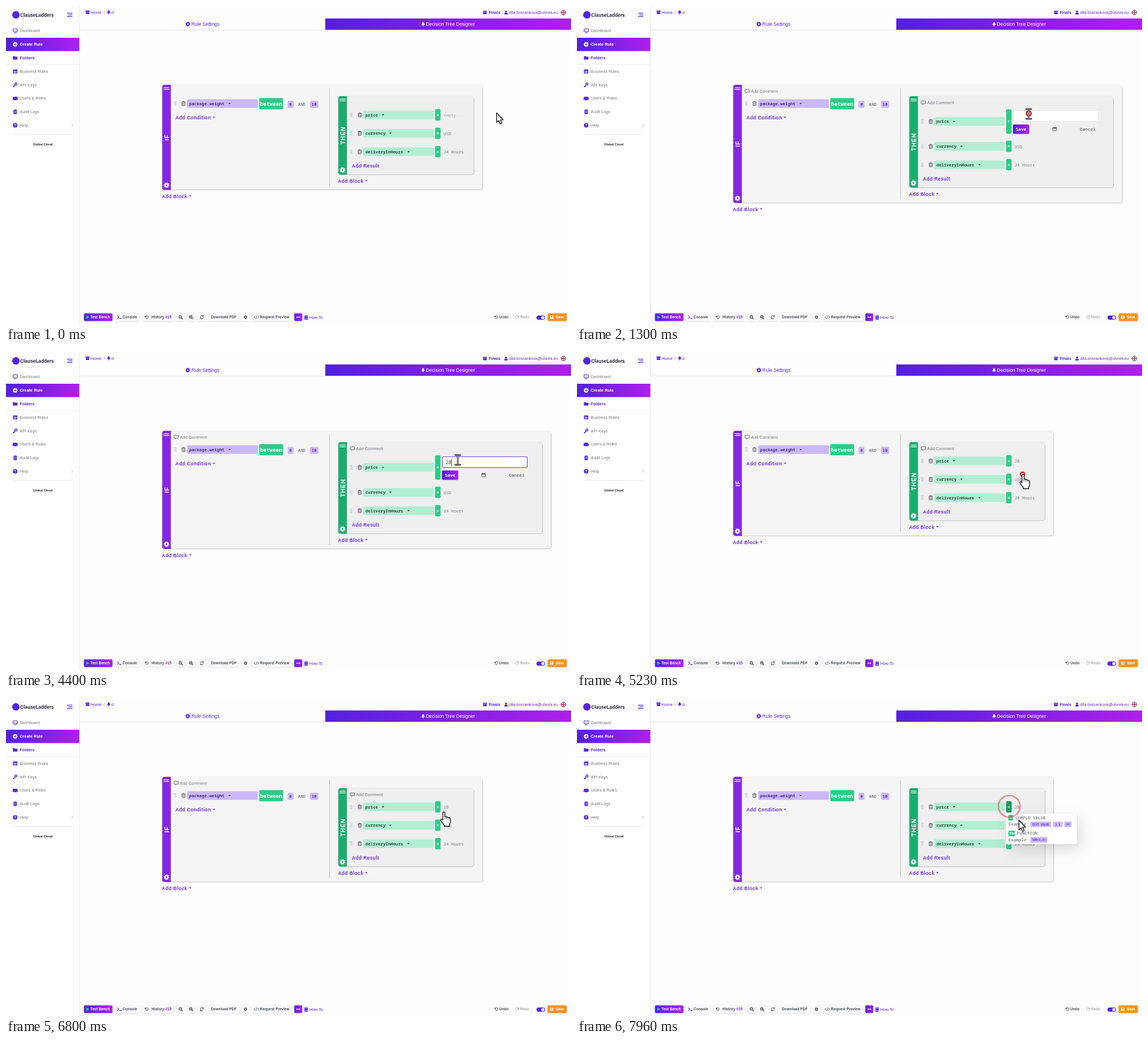
Animation of 998 by 561 pixels, one loop 8000 ms. Source, as an HTML page:

```html
<!DOCTYPE html>
<html lang="en">
<head>
<meta charset="utf-8">
<title>Decision tree editor</title>
<style>
html, body { margin: 0; width: 100%; height: 100%; overflow: hidden; background: #fefefe; }
svg { display: block; width: 100vw; height: 100vh; }
text { font-family: "Liberation Sans", sans-serif; white-space: pre; }
.b { font-weight: 700; }
.m { font-family: "Noto Sans Mono", monospace; }
.s { font-weight: 600; }
.link { font-weight: 700; letter-spacing: .43px; }
.c { text-anchor: middle; }
#popup > rect:first-child { filter: drop-shadow(7px 10px 12px #0002) drop-shadow(0 1px 2px #0001); }
.lift { filter: drop-shadow(0 1px 1.5px #0002); }
</style>
</head>
<body>
<svg id="stage" viewBox="0 0 998 561" xmlns="http://www.w3.org/2000/svg"></svg>
<script>
const PURPLE = '#5226dc', LINK = '#6a2cdc', GREY = '#74767c', DARK = '#4b4f58';
const GREEN = '#2bcc89', MINT = '#b1eed2', LILAC = '#cab8f8', WHITE = '#fff', GRAD = 'url(#grad)';

// Drawing helpers; text y is the middle of the capitals
const text = (x, y, str, size, fill, cls = '') =>
  `<text x="${x}" y="${y + size * .35}" font-size="${size}" fill="${fill}" class="${cls}">${str}</text>`;
const rect = (x, y, w, h, fill, r = 0, more = '') =>
  `<rect x="${x}" y="${y}" width="${w}" height="${h}" rx="${r}" fill="${fill}" ${more}/>`;
const path = (d, fill, more = '') => `<path d="${d}" fill="${fill}" ${more}/>`;
const line = (d, color, w = 1) =>
  path(d, 'none', `stroke="${color}" stroke-width="${w}" stroke-linecap="round" stroke-linejoin="round"`);
const dot = (x, y, r, fill, more = '') => `<circle cx="${x}" cy="${y}" r="${r}" fill="${fill}" ${more}/>`;
const circle = (x, y, r, color, w = 1, more = '') =>
  dot(x, y, r, 'none', `stroke="${color}" stroke-width="${w}" ${more}`);
const gear = (x, y, r, color) => circle(x, y, r * .54, color, r * .42) +
  circle(x, y, r * .84, color, r * .34, 'pathLength="16" stroke-dasharray="1.1 .9"');
const caret = (x, y, color) => path(`M${x - 2.2} ${y - 1}h4.4l-2.2 2.4z`, color);
const group = (id, body, more = '') => `<g id="${id}" ${more}>${body}</g>`;

const trash = (x, y) => rect(x - 2.6, y - 2.4, 5.2, 6.2, 'none', .8, `stroke="${DARK}" stroke-width=".9"`) +
  line(`M${x - 3.4} ${y - 2.6}h6.8M${x - 1.2} ${y - 3.8}h2.4M${x - .9} ${y - .6}v2.8M${x + .9} ${y - .6}v2.8`, DARK, .75);
const grip = (x, y) =>
  path(`M${x - 1.2} ${y - 4}v8M${x + 1.2} ${y - 4}v8`, 'none', 'stroke="#aaa" stroke-width="1" stroke-dasharray="1.4 .7"');
const tree = (x, y, c) => path(`M${x} ${y - 4}l2.4 3h-1l2 2.6h-2.7v2h-1.4v-2h-2.7l2-2.6h-1z`, c);
const box = (x, y, c) => path(`M${x - 3.6} ${y - 3}h7.2v2h-7.2zM${x - 3.1} ${y - .5}h6.2v3.6h-6.2z`, c);
const person = (x, y, c, k = 1) =>
  dot(x, y - 1.7 * k, 1.8 * k, c) + path(`M${x - 3 * k} ${y + 3.5 * k}q0-3.3 ${3 * k}-3.3t${3 * k} 3.3z`, c);
const comment = (x, y) =>
  line(`M${x} ${y - 3}h7v5h-3.6l-1.6 1.7v-1.7h-1.8z`, DARK, .8) + text(x + 10, y, 'Add Comment', 7.4, GREY);

function sidebar() {
  const item = (y, str) => text(24.3, y, str, 7.28, GREY);
  return rect(0, 0, 129.5, 561, WHITE) + rect(129.3, 0, 1, 561, '#e9e9ee') +
    dot(17.5, 15.7, 6.6, PURPLE) + text(25, 15.7, 'ClauseLadders', 8.3, '#262338', 'b') +
    line('M108.3 12.7h8.5M110.5 15.7h6.3M108.3 18.7h8.5', PURPLE, 1.2) +
    rect(12.5, 40.2, 7.6, 5, 'none', .7, `stroke="${PURPLE}" stroke-width="1.1"`) + line('M14.5 47.3h3.6', PURPLE, 1) +
    item(43.7, 'Dashboard') +
    rect(0, 56, 129.5, 23.5, GRAD) + dot(16.2, 67.8, 4, WHITE) + line('M14.2 67.8h4M16.2 65.8v4', '#5a22e0', 1.1) +
    text(24.3, 67.8, 'Create Rule', 7.28, WHITE, 'b') +
    path('M12.2 88.4h3l1 1h4v5h-8z', PURPLE) + text(24.3, 91.5, 'Folders', 7.28, PURPLE, 'b') +
    rect(0, 103, 129.5, .8, '#e6e6ea') +
    rect(12.3, 112, 7.8, 7, PURPLE, .8) + line('M13.3 115h5.8M13.3 117.2h5.8M16.2 114.6v3.6', WHITE, .7) +
    item(115.5, 'Business Rules') +
    circle(17.6, 137.6, 1.9, PURPLE, 1.4) + line('M16 139.3l-3.2 3.1M13.6 141.6l1 1', PURPLE, 1.4) + item(139.4, 'API Keys') +
    person(13.6, 162.5, PURPLE, .75) + person(18.8, 162.5, PURPLE, .75) + person(16.2, 163, PURPLE, .95) +
    item(162.7, 'Users &amp; Roles') +
    rect(12.9, 182.8, 6.6, 8, PURPLE, 2) + line('M13.4 185.4h5.6M13.4 188h5.6', WHITE, .6) + item(186.6, 'Audit Logs') +
    dot(16.2, 210.5, 4, PURPLE) + text(16.2, 210.6, '?', 6.4, WHITE, 'b c') + item(210.5, 'Help') +
    line('M116.3 208.4l2 2-2 2', '#999', .8) + rect(13, 226.2, 104, .8, '#e0e0e4') +
    text(65, 244.2, 'Global Cloud', 5.5, '#222', 'b c');
}

function header() {
  const flag = dot(984.5, 11.5, 4.8, '#2b4a9b') +
    line('M981.4 8.4l6.2 6.2M987.6 8.4l-6.2 6.2', WHITE, 1.3) +
    line('M980.6 11.5h7.8M984.5 7.6v7.8', WHITE, 2.6) + line('M980.2 11.5h8.6M984.5 7.2v8.6', '#d8243c', 1.4);
  return box(144, 11, PURPLE) + text(149.3, 11.3, 'Home', 7.28, PURPLE) + text(172.5, 11.3, '/', 7.28, GREY) +
    tree(181.4, 11, PURPLE) + text(186, 11.3, 'd', 7.28, PURPLE) +
    box(846, 11.4, PURPLE) + text(852.7, 11.6, 'Finals', 7.1, PURPLE, 'b') +
    person(883.2, 11.4, PURPLE) + text(888.3, 11.6, 'dita.brezankova@ulvrek.eu', 7.15, LINK) + flag +
    gear(321.2, 32, 4.2, PURPLE) + text(327.6, 32, 'Rule Settings', 8.32, PURPLE) +
    rect(130, 42, 434, .8, '#d6d6da') + rect(564, 22, 434, 20, GRAD) +
    tree(736.8, 32, WHITE) + text(741.8, 32, 'Decision Tree Designer', 8.32, WHITE);
}

function toolbar() {
  const y = 549;
  const btn = (x, w, fill = '#f9f9fb') => rect(x, 542.3, w, 13.4, fill, 1.8, 'class="lift"');
  const label = (x, str, fill = DARK) => text(x, y, str, 6.5, fill, 'b');
  const lens = (x, d) => circle(x - .6, y - .6, 2.3, DARK, 1.1) + line(`M${x + 1.3} ${y + 1.3}l1.7 1.7`, DARK, 1.3) +
    line(`M${x - 1.6} ${y - .6}h2${d}`, DARK, .7);
  const turn = (x, c, k) =>
    line(`M${x - 2.5 * k} ${y - 2.4}v2h${2 * k}M${x - 2.3 * k} ${y - .6}a2.6 2.6 0 1 ${k > 0 ? 1 : 0} ${.8 * k} 2.4`, c, 1);
  return btn(137.7, 50.4, GRAD) + path('M141.8 546l5.6 3-5.6 3z', GREEN) + label(149, 'Test Bench', WHITE) +
    btn(192.3, 43.8) + line('M197 546.7l2.4 2.2-2.4 2.2M200.6 551.4h3', PURPLE, 1.1) + label(206, 'Console') +
    btn(240.7, 56.6) + turn(248.3, DARK, 1) + line('M248.3 547.8v1.4l.9.6', DARK, .7) +
    label(257, 'History') + label(281.6, '#15', LINK) +
    btn(301.2, 14.8) + lens(308.6, '') + btn(319.6, 14.8) + lens(327, 'm-1-1v2') +
    btn(338.3, 15.2) + line('M343.3 548.4a2.7 2.7 0 0 1 5-1M348.5 546v1.7h-1.7M348.5 549.6a2.7 2.7 0 0 1-5 1M343.3 552v-1.7h1.7', DARK, 1) +
    btn(357.8, 53.7) + text(362, y, 'Download PDF', 6.4, DARK, 'b') + btn(415.2, 15.4) + gear(423, y, 3.1, DARK) +
    btn(434.5, 70.7) + line('M440 547l-1.9 2 1.9 2M444.6 547l1.9 2-1.9 2M443 546.4l-1.4 5.2', DARK, .9) +
    label(448.6, 'Request Preview') +
    btn(509.3, 14, GRAD) + line('M513.4 549h5.8M514.6 547.9l-1.2 1.1 1.2 1.1M518 547.9l1.2 1.1-1.2 1.1', WHITE, .9) +
    rect(527.2, 546, 6, 7.4, PURPLE, .9) + line('M528.8 548h3M528.5 551.7h4.3', WHITE, .7) +
    text(535.7, 550, 'How-To', 7.1, PURPLE) +
    turn(866, DARK, 1) + label(871, 'Undo') + turn(903, '#a9abb0', -1) + label(908, 'Redo', '#a9abb0') +
    rect(937, 546, 15.2, 7.6, PURPLE, 3.8) + dot(948.3, 549.8, 2.7, WHITE) +
    btn(956.6, 34, '#f9921b') + rect(961, 546.2, 5.8, 5.8, WHITE, .8) + rect(962.2, 547, 3, 1.4, '#f9921b') +
    dot(963.9, 550.3, .9, '#f9921b') + label(971, 'Save', WHITE);
}

// One block frame: coloured bar with handle, rotated word and gear
function block(x, y, w, h, bg, color, word) {
  const cx = x + 7.5;
  return rect(x, y, w, h, bg, 4.5, 'stroke="#e2e2e4" stroke-width=".6"') +
    path(`M${x + 4} ${y + h}H${x + w - 4.5}q4.5 0 4.5-4.5V${y + 5}`, 'none', 'stroke="#bdbdc1" stroke-width=".9"') +
    path(`M${x + 15.2} ${y}v${h}h-11.2q-4 0-4-4v${8 - h}q0-4 4-4z`, color) +
    line(`M${x + 3} ${y + 5.3}h9.2M${x + 3} ${y + 8.4}h9.2`, WHITE, 1.3) +
    `<text transform="translate(${cx + 4.8} ${y + h / 2}) rotate(-90)" font-size="10.4" letter-spacing=".9" fill="#fff" class="b c">${word}</text>` +
    gear(cx, y + h - 8.4, 4.9, WHITE);
}

function board(open) {
  const dy = open ? 23 : 0, dx = open ? 121 : 0;
  const addBlock = (x, y) => text(x, y, 'Add Block', 8.32, LINK, 'link') + caret(x + 50, y - .6, LINK);
  const row = (y, name, value, cx, h = 20) => grip(610, y) + trash(624.8, y) +
    rect(630.8, y - 7.6, 124.8, 15.2, MINT, 2.5) + text(634.8, y, name, 7.42, '#2a4a42', 'm s') + caret(cx, y, '#2a4a42') +
    rect(758, y - h / 2, 9.6, h, GREEN, 2) + text(762.8, y, '=', 7.4, WHITE, 'm b c') +
    (value ? text(773, y + .5, value, 7.42, GREY, 'm') : '');
  const badge = (x, w, str) => rect(x, 167.3, w, 12.4, LILAC, 2.5) + text(x + w / 2, 173.6, str, 7.42, '#5d3fb0', 'm s c');
  const editor = rect(770.9, 184.8, 149.7, 19, WHITE, 1.5, 'id="field" stroke-width="1.1"') +
    '<text id="typed" class="m" x="776.2" y="198" font-size="8.9" fill="#444"></text>' +
    rect(786.6, 189, .8, 12, '#222', 0, 'id="bar"') +
    rect(770, 209, 28.8, 16.4, GRAD, 2, 'class="lift"') + text(784.4, 217.2, 'Save', 7.75, WHITE, 'm b c') +
    rect(840.4, 214.4, 6.6, 5.6, 'none', .7, `stroke="${DARK}" stroke-width=".9"`) + rect(840.4, 214.2, 6.6, 2, DARK) +
    text(888, 217.2, 'Cancel', 7.75, GREY, 'm s');
  const price = open ? row(203.7, 'price', '', 666, 43) + editor
    : row(192, 'price', '', 666) + '<text id="value" class="m" x="773" y="195.2" font-size="7.42"></text>' +
      group('hot', rect(758, 182, 9.6, 20, '#1c9a64', 2) + text(762.8, 192, '=', 7.4, WHITE, 'm b c'));
  return block(276, 139, 566 + dx, 185.5 + dy, '#f5f5f6', '#8428e0', 'IF') +
    rect(571, 145, .9, 173 + dy, '#bbbbc0') +
    grip(299, 172) + trash(313.5, 172) + rect(320, 164.5, 125, 15.2, LILAC, 2.5) +
    text(323.6, 172, 'package.weight', 7.42, '#45308c', 'm s') + caret(395, 172, '#45308c') +
    rect(447.3, 162.6, 42.2, 19.6, GREEN, 2) + text(468.4, 172.6, 'between', 9.25, WHITE, 'm b c') +
    badge(497.4, 10.6, '0') + text(522.4, 173.6, 'AND', 7.42, DARK, 'm c') + badge(536.8, 14.8, '10') +
    text(299.3, 197.2, 'Add Condition', 8.32, LINK, 'link') + caret(367.4, 196.6, LINK) +
    block(587, 159, 239.7 + dx, 138.6 + dy, '#efeff0', '#1dac6e', 'THEN') + price +
    row(224.6 + dy, 'currency', 'USD', 679) + row(257 + dy, 'deliveryInHours', '24 Hours', 711) +
    text(611, 282 + dy, 'Add Result', 8.32, LINK, 'link') + addBlock(586.5, 308.7 + dy) + addBlock(275.3, 335.6 + dy);
}

function popup() {
  const tag = (x, y, w, str) => rect(x, y, w, 9.8, LILAC, 2) + text(x + w / 2, y + 5, str, 5, '#5d3fb0', 'm s c');
  const sign = (y, w, str) => rect(762, y - 5, w, 10, GREEN, 1.5) + text(762 + w / 2, y, str, 6.8, WHITE, 'm b c');
  const word = (x, y, str) => text(x, y, str, 7.55, DARK, 'm');
  return rect(758, 204, 125, 54, WHITE, 2) +
    sign(211.3, 8.2, '=') + word(773.8, 211, 'SIMPLE VALUE') + word(762, 222.8, 'Example:') +
    tag(800.5, 218, 37, 'TEXT VALUE') + tag(841, 218, 16.4, '1.1') + tag(861, 218, 12.6, '95') +
    sign(239, 11.4, 'fn') + word(777, 238.7, 'FUNCTION') + word(762, 250, 'Example:') +
    tag(800.5, 245.2, 30.4, 'SUM(1,2)');
}

const beam = 'M-4.3-8.2h2.8q1.5 0 1.5 1.5V7.6q0 1.6-1.5 1.6h-2.8M4.3-8.2h-2.8Q0-8.2 0-6.7V7.6q0 1.6 1.5 1.6h2.8';
const outline = 'stroke="#161616" stroke-width="1.4" stroke-linejoin="round"';
const cursors =
  group('arrow', path('M.6.5V17.4L4.3 14 7 20.2 10 18.9 7.3 12.9H12.3z', WHITE, outline)) +
  group('ibeam', line(beam, '#161616', 2.8) + line(beam, '#d8d8d8', .7)) +
  group('hand', path('M-1 2.2Q-1 .6 .8 .6T2.7 2.2V9Q4.6 8 6 9.8 8 9 9.3 10.9 12.4 10.4 12.4 13.6V18Q12.4 21 10.7 23V25.8H1.4V23.8Q-1 21-4 16.6-5.4 14.2-3.9 13.3-2.6 12.6-1 15z', WHITE, outline) +
    line('M2.7 9v4M6 10v3.4M9.3 11v2.8', '#161616', .8));

const $ = id => document.getElementById(id);
$('stage').innerHTML =
  '<defs><linearGradient id="grad"><stop stop-color="#5320e0"/><stop offset="1" stop-color="#ae20ea"/></linearGradient></defs>' +
  sidebar() + header() + toolbar() + group('closed', board(false)) + group('opened', board(true)) +
  group('noteIf', comment(297.3, 150)) + group('noteThen', comment(608.6, 170.3)) +
  group('popup', popup()) + circle(0, 0, 1, '#e3262c', 3, 'id="ring"') + group('cursor', cursors);

// Pointer stops: time, x, y
const stops = [
  [0, 866, 188], [260, 866, 188], [860, 798, 190], [4400, 798, 190], [5040, 787, 215.5],
  [6530, 787, 215.5], [7000, 763.5, 191], [7400, 763.5, 191], [7680, 795, 207], [7900, 780, 215], [8000, 780, 215]
];
const clicks = [[1100, 798, 189.5], [5060, 787, 215.5], [7020, 763.5, 191]];

function pointer(t) {
  const i = Math.max(1, stops.findIndex(s => s[0] > t));
  const [a, b] = [stops[i - 1], stops[i]];
  const p = (t - a[0]) / (b[0] - a[0]), e = p * p * (3 - 2 * p);
  return [a[1] + (b[1] - a[1]) * e, a[2] + (b[2] - a[2]) * e];
}
const show = (id, on) => $(id).setAttribute('visibility', on ? 'visible' : 'hidden');
const set = (id, attrs) => { for (const k in attrs) $(id).setAttribute(k, attrs[k]); };

function shape(t, y) {
  if (t < 1240 || t > 7450) return 'arrow';
  if (t > 5040 || y > 209) return 'hand';
  return y > 204.5 ? 'arrow' : 'ibeam';
}

function render(t) {
  const [x, y] = pointer(t);
  const open = t >= 1240 && t < 5230, focus = t >= 1400 && t < 5060;
  set('closed', { display: open ? 'none' : 'inline' });
  set('opened', { display: open ? 'inline' : 'none' });
  set('field', { stroke: focus ? '#6a3ad8' : '#e6e6ea' });
  $('typed').textContent = t < 2630 ? '' : t < 3130 ? '2' : '28';
  set('bar', { opacity: (t >= 3260 && t < 3800) || (t >= 4400 && t < 4930) ? 1 : 0 });
  $('value').textContent = t < 5230 ? 'Empty...' : '28';
  set('value', { fill: t < 5230 ? '#a6a8ac' : GREY });
  set('hot', { opacity: t >= 6930 ? 1 : 0 });

  show('noteIf', t < 7480 && x < 842);
  show('noteThen', t < 7480 && x < 827);
  set('popup', { opacity: Math.min(1, Math.max(0, (t - 7160) / 120)) });

  const hit = clicks.find(c => t >= c[0] && t < c[0] + 1260);
  show('ring', hit);
  if (hit) {
    const age = t - hit[0], r = 1.4 + .0203 * age;
    const w = Math.min(2.8, r);
    set('ring', { cx: hit[1], cy: hit[2], r: r - w / 2, 'stroke-width': w, opacity: Math.min(1, 1.3 - age / 1120) });
  }
  set('cursor', { transform: `translate(${x} ${y})` });
  const now = shape(t, y);
  for (const id of ['arrow', 'ibeam', 'hand']) show(id, id === now);
}

const start = performance.now();
function tick() {
  render((performance.now() - start) % 8000);
  requestAnimationFrame(tick);
}
tick();
</script>
</body>
</html>
```
